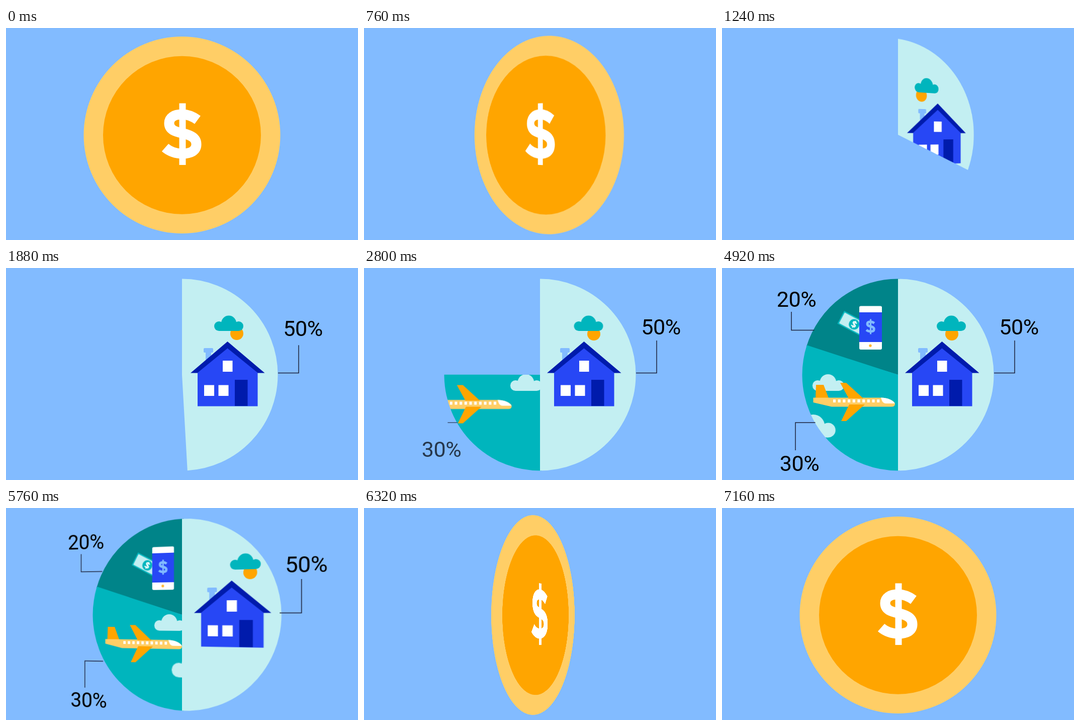
Write an HTML page without scripts that moves like this. It is 700 px wide and 421 px high and loops after 7200 ms.

```html
<!DOCTYPE html>
<html lang="en">
<head>
<meta charset="utf-8">
<title>Budget split</title>
<style>
  html, body { margin: 0; width: 100%; height: 100%; overflow: hidden; background: #82bbff; }
  .stage { position: absolute; left: 0; top: 0; width: 700px; height: 421px; overflow: hidden; }
  .view { position: absolute; inset: 0; perspective: 1050px; perspective-origin: 350px 212px; }
  .near { perspective: 663px; }

  /* two faces of one turning disc */
  .face {
    position: absolute; left: 0; top: 0; overflow: visible;
    transform-origin: 350px 212px; backface-visibility: hidden;
    animation: spin 7.2s infinite;
  }
  .back { transform: rotateY(180deg); }
  @keyframes spin {
    0% { rotate: y 0deg; animation-timing-function: cubic-bezier(.7, 0, .3, 1); }
    26.39% { rotate: y -180deg; }
    73.47% { rotate: y -180deg; animation-timing-function: cubic-bezier(.7, 0, .3, 1); }
    99.86%, 100% { rotate: y -360deg; }
  }

  g, text, polyline, .sweep { animation: 0s linear infinite; animation-duration: 7.2s; }

  /* wedges */
  .sweep { fill: none; stroke: #fff; stroke-width: 190.5; stroke-dasharray: 0 400; }
  .s1 { animation-name: sweep1; }
  .s2 { animation-name: sweep2; }
  .s3 { animation-name: sweep3; }
  @keyframes sweep1 {
    0%, 13.37% { stroke-dasharray: 0 400; animation-timing-function: cubic-bezier(.15, .3, .1, 1); }
    30.04%, 100% { stroke-dasharray: 180 400; }
  }
  @keyframes sweep2 {
    0%, 32.08% { stroke-dasharray: 0 400; animation-timing-function: cubic-bezier(.15, .3, .1, 1); }
    48.75%, 100% { stroke-dasharray: 109 400; }
  }
  @keyframes sweep3 {
    0%, 50.56% { stroke-dasharray: 0 400; animation-timing-function: cubic-bezier(.15, .3, .1, 1); }
    67.22%, 100% { stroke-dasharray: 74 400; }
  }

  /* labels */
  text { font: 400 43px Roboto, Arial, sans-serif; letter-spacing: -.5px; text-anchor: middle; fill: #000; }
  polyline { fill: none; stroke: #1c2238; stroke-width: 1.5; stroke-dasharray: 1 2; }
  .l1 { animation-name: label1; }
  .l2 { animation-name: label2; }
  .l3 { animation-name: label3; }
  text { --dy: 35px; }
  text.l2 { --dy: -35px; }
  polyline { --dy: 0px; }
  @keyframes label1 {
    0%, 19.44% { opacity: 0; stroke-dashoffset: 1; transform: translateY(var(--dy)); animation-timing-function: cubic-bezier(.3, 1, .6, 1); }
    22.2% { opacity: 1; }
    32.36%, 100% { opacity: 1; stroke-dashoffset: 0; transform: translateY(0); }
  }
  @keyframes label2 {
    0%, 38.06% { opacity: 0; stroke-dashoffset: 1; transform: translateY(var(--dy)); animation-timing-function: cubic-bezier(.3, 1, .6, 1); }
    40.8% { opacity: 1; }
    50.97%, 100% { opacity: 1; stroke-dashoffset: 0; transform: translateY(0); }
  }
  @keyframes label3 {
    0%, 56.53% { opacity: 0; stroke-dashoffset: 1; transform: translateY(var(--dy)); animation-timing-function: cubic-bezier(.3, 1, .6, 1); }
    59.3% { opacity: 1; }
    69.44%, 100% { opacity: 1; stroke-dashoffset: 0; transform: translateY(0); }
  }

  /* things inside the wedges; all drift right as the disc turns away */
  .house { animation-name: house; }
  @keyframes house {
    0%, 13.19% { transform: translateX(10px); }
    17.22% { transform: translateX(6.5px); }
    26.11% { transform: translateX(3px); }
    31.25% { transform: translateX(0); }
    73.47% { transform: translateX(0); animation-timing-function: cubic-bezier(.33, 0, .67, .33); }
    86.67%, 100% { transform: translateX(42px); }
  }
  .cloud { animation-name: cloud; }
  @keyframes cloud {
    0%, 13.19% { transform: translateX(-56px); }
    17.22% { transform: translateX(-39px); animation-timing-function: ease-out; }
    26.11% { transform: translateX(-13px); }
    51.67% { transform: translateX(-6px); }
    68.33% { transform: translateX(0); }
    73.47% { transform: translateX(2px); animation-timing-function: cubic-bezier(.33, 0, .67, .33); }
    86.67%, 100% { transform: translateX(66px); }
  }
  .sun { animation-name: sun; }
  @keyframes sun {
    0%, 13.19% { transform: translate(-84px, -1px); }
    17.22% { transform: translate(-53px, 0); animation-timing-function: ease-out; }
    26.11% { transform: translate(2px, -1px); }
    33% { transform: translate(0, 0); }
    73.47% { transform: translate(0, 0); animation-timing-function: cubic-bezier(.33, 0, .67, .33); }
    86.67%, 100% { transform: translate(106px, 0); }
  }
  .plane { animation-name: plane; }
  @keyframes plane {
    0%, 33% { transform: translate(-210px, 6px); animation-timing-function: cubic-bezier(.33, 1, .68, 1); }
    48.5% { transform: translate(0, 4px); }
    51.67% { transform: translate(0, 3px); animation-timing-function: ease-in-out; }
    68.33% { transform: translate(0, 0); animation-timing-function: ease-in-out; }
    73.47% { transform: translate(0, 2px); }
    80% { transform: translate(6px, 5px); }
    86.67%, 100% { transform: translate(24px, 5px); }
  }
  .drift { animation-name: drift; }
  @keyframes drift {
    0%, 33% { transform: translateX(133px); }
    51.67% { transform: translateX(63px); }
    68.33% { transform: translateX(0); }
    80% { transform: translateX(-130px); }
    86.67%, 100% { transform: translateX(-175px); }
  }
  .fast { animation-name: fast; }
  @keyframes fast {
    0%, 51.67% { transform: translateX(216px); }
    68.33% { transform: translateX(0); }
    80% { transform: translateX(-151px); }
    86.67%, 100% { transform: translateX(-210px); }
  }
  .phone { animation-name: phone; }
  @keyframes phone {
    0%, 50.56% { transform: translate(0, 140px); }
    51.67% { transform: translate(0, 122px); animation-timing-function: cubic-bezier(.25, .8, .4, 1); }
    62.5% { transform: translate(0, 0); }
    73.47% { transform: translate(0, 0); animation-timing-function: cubic-bezier(.33, 0, .67, .33); }
    86.67%, 100% { transform: translate(64px, 0); }
  }
  .note { animation-name: note; }
  @keyframes note {
    0%, 55.5% { transform: translate(42px, 22px); animation-timing-function: cubic-bezier(.33, 1, .68, 1); }
    66%, 100% { transform: translate(0, 0); }
  }
</style>
</head>
<body>
<div class="stage">

  <div class="view">
    <svg class="face" width="700" height="421">
      <defs>
        <g id="dollar" fill="none" stroke="currentColor">
          <path stroke-width="20" d="M381 182.500C372 176 361 171.500 350 171.500C334 171.500 324.500 178 324.500 189C324.500 203 338 206 351 209C366 212.500 378.500 217 378.500 231C378.500 244 367 249.500 350.500 249.500C338 249.500 325 245 316.500 237.500"/>
          <path stroke-width="13" d="M351 149.500V272"/>
        </g>
        <g id="puff">
          <circle cx="10.500" cy="22.500" r="10.500"/>
          <circle cx="31" cy="16.500" r="16.500"/>
          <circle cx="52.500" cy="22.500" r="10.500"/>
          <path d="M10.500 17H52.500V33H10.500Z"/>
        </g>
      </defs>
      <circle cx="350" cy="212.500" r="195.500" fill="#ffce66"/>
      <circle cx="350" cy="212.700" r="157" fill="#ffa500"/>
      <use href="#dollar" color="#fff"/>
    </svg>
  </div>

  <div class="view near">
    <svg class="face back" width="700" height="421">
      <defs>
        <mask id="m1" maskUnits="userSpaceOnUse" x="0" y="0" width="700" height="421">
          <circle class="sweep s1" cx="350" cy="212" r="95.250" pathLength="360" transform="rotate(-90 350 212)"/>
        </mask>
        <mask id="m2" maskUnits="userSpaceOnUse" x="0" y="0" width="700" height="421">
          <circle class="sweep s2" cx="350" cy="212" r="95.250" pathLength="360" transform="rotate(89 350 212)"/>
        </mask>
        <mask id="m3" maskUnits="userSpaceOnUse" x="0" y="0" width="700" height="421">
          <circle class="sweep s3" cx="350" cy="212" r="95.250" pathLength="360" transform="rotate(197 350 212)"/>
        </mask>
      </defs>

      <!-- savings -->
      <g mask="url(#m3)">
        <circle cx="350" cy="212" r="192" fill="#008489"/>
        <g class="phone">
          <g class="note">
            <g transform="translate(243 85) rotate(28)">
              <rect width="60" height="29" fill="#00b5bd"/>
              <rect x="2.500" y="2.500" width="55" height="24" fill="#c3eff2"/>
              <circle cx="30" cy="14.500" r="10.500" fill="#00b5bd"/>
              <use href="#dollar" color="#fff" transform="translate(30 14.500) scale(.125) translate(-350 -211)"/>
            </g>
          </g>
          <rect x="273" y="75.500" width="45" height="86.500" rx="3" fill="#fff"/>
          <rect x="273" y="88" width="45" height="59" fill="#2747f5"/>
          <circle cx="295" cy="154.300" r="2.700" fill="#ffb733"/>
          <use href="#dollar" color="#82bbff" transform="translate(295.300 116.500) scale(.245) translate(-350 -211)"/>
        </g>
      </g>

      <!-- travel -->
      <g mask="url(#m2)">
        <circle cx="350" cy="212" r="192" fill="#00b5bd"/>
        <g class="drift" fill="#c3eff2">
          <use href="#puff" x="180" y="211"/>
          <use href="#puff" x="423" y="211"/>
        </g>
        <g class="fast" fill="#c3eff2">
          <use href="#puff" transform="translate(139 291) scale(1.380)"/>
          <use href="#puff" transform="translate(480 291) scale(1.380)"/>
        </g>
        <g class="plane">
          <path fill="#ffa500" d="M187 232H202L212 258H186Z"/>
          <path fill="#ffce66" d="M181.500 257.500H316C330 257.500 344 264 344 270Q344 275.500 337 275.500H218L181.500 267Z"/>
          <path fill="#fff" d="M316 257.500C330 257.500 341 263 343.500 269H327Q320 269 318 263Z"/>
          <path fill="#ffa500" d="M235 228H247L281 259H252ZM253 271H284L247 304H237Z"/>
          <path stroke="#fff" stroke-width="6" stroke-dasharray="5 4.700" d="M221 264H313.500"/>
        </g>
      </g>

      <!-- home -->
      <g mask="url(#m1)">
        <circle cx="350" cy="212" r="192" fill="#c3eff2"/>
        <g class="sun"><circle cx="457" cy="131" r="13" fill="#ffa500"/></g>
        <g class="cloud" fill="#00b5bd">
          <circle cx="436.500" cy="115.500" r="9.500"/>
          <circle cx="456" cy="109.500" r="15"/>
          <circle cx="475.500" cy="115.500" r="9.500"/>
          <path d="M436.500 110H475.500V125H436.500Z"/>
        </g>
        <g class="house">
          <path fill="#82bbff" d="M392 159H407Q409 159 409 161V166Q409 168 407 168H405V190H394V168H392Q390 168 390 166V161Q390 159 392 159Z"/>
          <path fill="#001bac" d="M437.500 146L511.500 208.500H364Z"/>
          <path fill="#2747f5" d="M378 274.500V208L437.500 159.500L497.500 208V274.500Z"/>
          <path fill="#fff" d="M428 184H447.500V206H428ZM391 232.500H411V254H391ZM419.500 232.500H439.500V254H419.500Z"/>
          <path fill="#001bac" d="M452 222H477.500V274H452Z"/>
        </g>
      </g>
    </svg>
  </div>

  <div class="view">
    <svg class="face back" width="700" height="421">
      <polyline class="l1" pathLength="1" points="541,208.500 582,208.500 582,144"/>
      <text class="l1" x="590.500" y="131.500">50%</text>
      <polyline class="l2" pathLength="1" points="185.500,307 146,307 146,362"/>
      <text class="l2" x="154" y="402.500">30%</text>
      <polyline class="l3" pathLength="1" points="183.500,123.500 138,123.500 138,87"/>
      <text class="l3" x="148" y="77">20%</text>
    </svg>
  </div>

</div>
</body>
</html>
```
